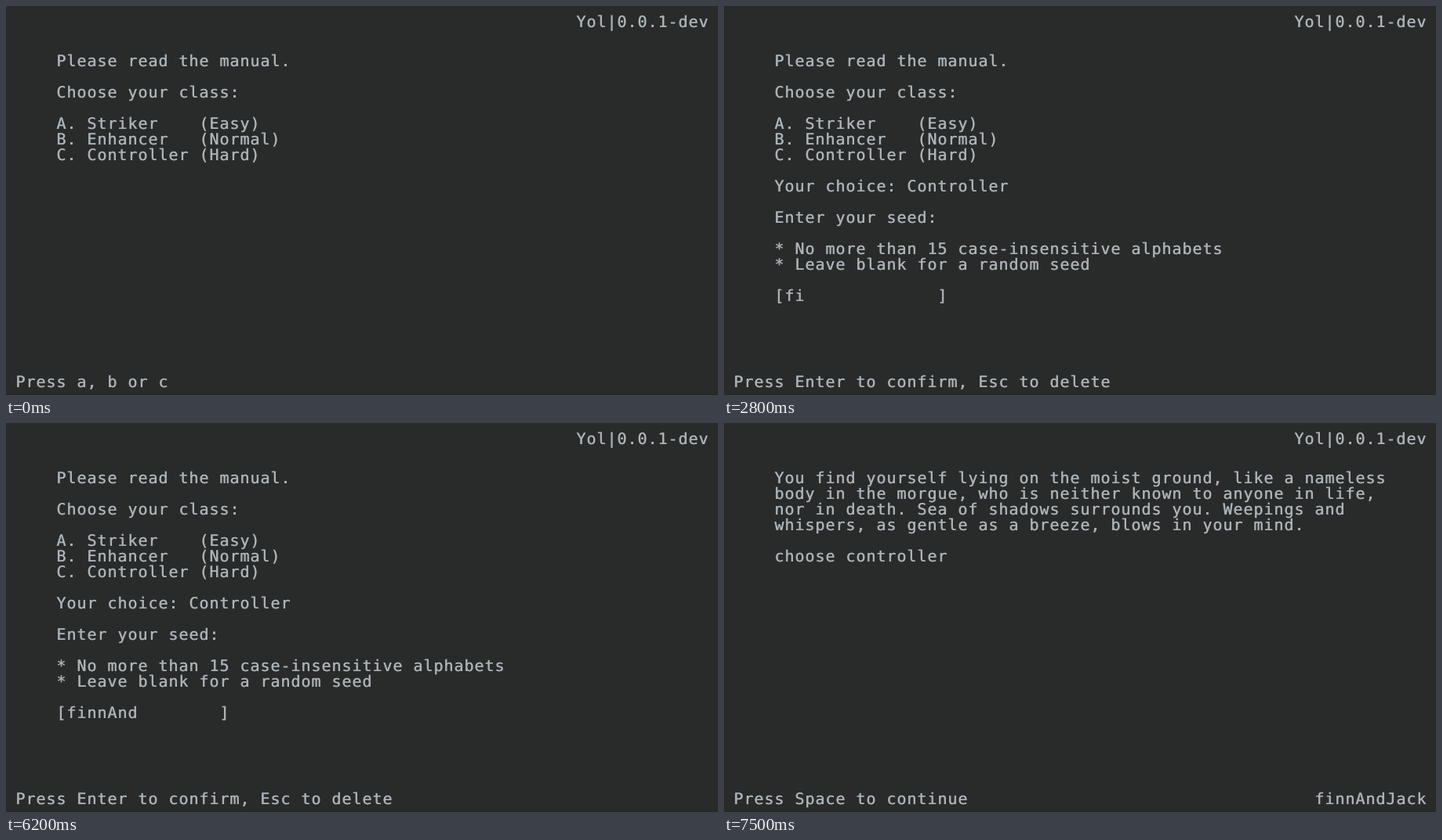
Write an HTML page with a canvas that moves like this. It is 908 px wide and 497 px high and loops after 8 s.

```html
<!DOCTYPE html>
<html lang="en">
<head>
<meta charset="utf-8">
<title>Terminal game start</title>
<style>
  html, body { margin: 0; width: 100%; height: 100%; overflow: hidden; background: #292b2b; }
  canvas { display: block; }
</style>
</head>
<body>
<canvas id="stage" width="908" height="497"></canvas>
<script>
const ctx = document.getElementById('stage').getContext('2d');
const LOOP = 8000, CELL = 13, LINE = 20;
const BACK = '#292b2b', INK = '#abb2b6', EDGE = '#272526';
const COLS = 69, INDENT = 5, TOP = 77, FOOT = 487;

const INTRO = [
  'Please read the manual.', '',
  'Choose your class:', '',
  'A. Striker    (Easy)',
  'B. Enhancer   (Normal)',
  'C. Controller (Hard)'
];
const SEED = [
  '', 'Your choice: Controller', '',
  'Enter your seed:', '',
  '* No more than 15 case-insensitive alphabets',
  '* Leave blank for a random seed', ''
];
const STORY = [
  'You find yourself lying on the moist ground, like a nameless',
  'body in the morgue, who is neither known to anyone in life,',
  'nor in death. Sea of shadows surrounds you. Weepings and',
  'whispers, as gentle as a breeze, blows in your mind.', '',
  'choose controller'
];

// Time of each key press and the seed field after it
const TYPED = [
  [0, ''], [2800, 'fi'], [4000, 'fin'], [4300, 'finn'], [4400, 'finna'],
  [4600, 'finnan'], [4700, 'finnand'], [4900, 'finnan'], [5200, 'finna'],
  [5400, 'finn'], [5500, 'finnA'], [5900, 'finnAn'], [6200, 'finnAnd'],
  [6300, 'finnAndJ'], [6600, 'finnAndJa'], [7000, 'finnAndJac'],
  [7200, 'finnAndJack']
];

const seedAt = t => TYPED.filter(([at]) => at <= t).pop()[1];

// Two passes half a pixel apart give the slightly heavy terminal stems
function put(text, col, y) {
  [...text].forEach((ch, i) => {
    if (ch === ' ') return;
    const x = (col + i) * CELL;
    ctx.fillText(ch, x - 0.75, y);
    ctx.fillText(ch, x - 0.25, y);
  });
}

const putRight = (text, y) => put(text, COLS - text.length, y);

function screenAt(t) {
  if (t < 1900) return { lines: INTRO, foot: 'Press a, b or c' };
  const seed = seedAt(t);
  if (t >= 7500) return { lines: STORY, foot: 'Press Space to continue', corner: seed };
  const lines = [...INTRO, ...SEED, `[${seed.padEnd(15)}]`];
  if (t < 7300) return { lines, foot: 'Press Enter to confirm, Esc to delete' };
  return { lines: [...lines, '', 'Would you like to continue?'], foot: 'Press y or n' };
}

function draw(t) {
  const { lines, foot, corner = '' } = screenAt(t);
  ctx.fillStyle = BACK;
  ctx.fillRect(0, 0, 908, 497);
  ctx.fillStyle = EDGE;
  ctx.fillRect(0, 496, 908, 1);
  ctx.fillStyle = INK;
  ctx.font = '20px "DejaVu Sans Mono", monospace';
  ctx.textRendering = 'geometricPrecision';
  putRight('Yol|0.0.1-dev', 27);
  lines.forEach((line, i) => put(line, INDENT, TOP + i * LINE));
  put(foot, 1, FOOT);
  putRight(corner, FOOT);
}

const start = performance.now();
function tick() {
  draw((performance.now() - start) % LOOP);
  requestAnimationFrame(tick);
}
tick();
</script>
</body>
</html>
```
